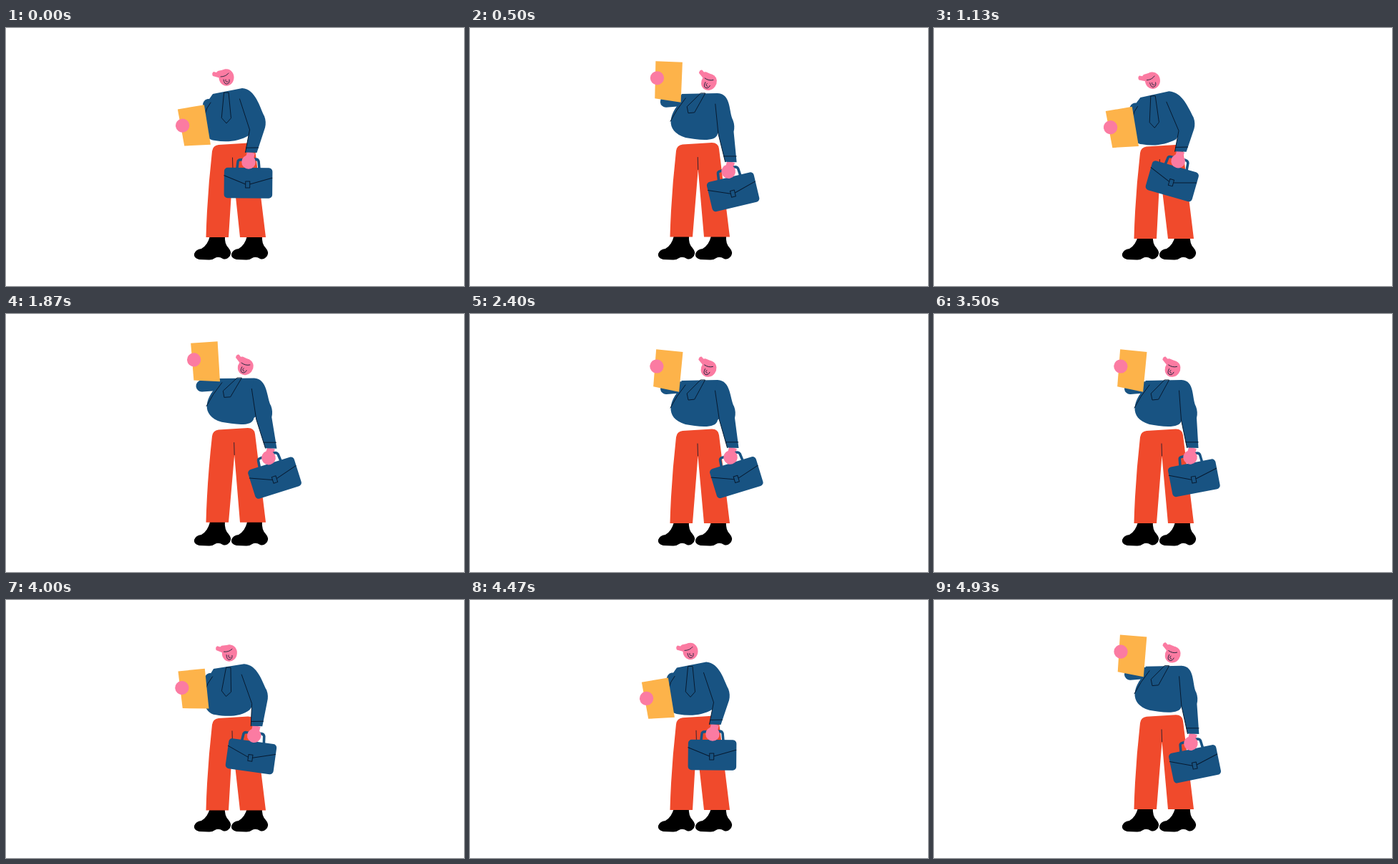
An HTML page that plays this animation: 640x360 px, repeating every 5000 ms.

```html
<!DOCTYPE html>
<html lang="en">
<head>
<meta charset="utf-8">
<title>Office worker</title>
<style>
  html, body { margin: 0; width: 100%; height: 100%; overflow: hidden; background: #fff; }
  svg { display: block; width: 100%; height: 100%; }
  .blue { fill: #185382; }
  .pink { fill: #fb7ba2; }
  .line { fill: none; stroke: #071a30; stroke-linejoin: round; stroke-linecap: round; }
  .thin { stroke-width: 0.8; }
</style>
</head>
<body>
<svg viewBox="0 0 640 360">
  <defs>
    <path id="shoe" d="M285 290H306Q305 301 311 307Q316 313 313 318Q308 324 303 322Q297 318 292 321Q288 324 283 323.5L270 323Q262 321 263 315Q265 309 273 308Q282 303 285 290Z"/>
  </defs>
  <use href="#shoe"/>
  <use href="#shoe" x="52"/>
  <path id="legs" fill="#f04a2c"/>
  <path id="crotch" class="line thin"/>
  <path id="sleeve" fill="none" stroke="#185382" stroke-width="16" stroke-linecap="round"/>
  <path id="torso" class="blue"/>
  <path id="fold" class="line"/>
  <path id="tie" class="line"/>
  <path id="wrist" fill="none" stroke="#fb7ba2" stroke-width="11"/>
  <path id="arm" class="blue"/>
  <path id="seam" class="line"/>
  <g id="bag">
    <path d="M-16 9L-15 0Q-15-3-11-3L10-4Q13-4 14-1L15 9" fill="none" stroke="#185382" stroke-width="3.600"/>
    <rect class="blue" x="-34" y="8" width="67.500" height="42.500" rx="5"/>
    <path class="line" d="M-34 19L-4 31M33 22L2 31M-4 27H2V36H-4Z"/>
    <circle class="pink" r="9.800"/>
  </g>
  <g id="paper">
    <path fill="#fdb34a" d="M-19-27L18.500-27V29L-18 25Z"/>
    <circle class="pink" cx="-16" cy="-3.500" r="9.600"/>
  </g>
  <g id="head">
    <ellipse class="pink" rx="10.500" ry="11.700"/>
    <path class="pink" d="M-1-11.500L-12-9L-14-7L-18-8Q-21-6-19-2L-8 1Z"/>
    <path class="line thin" d="M-8-1Q-1-1 3-6M-4 3Q-3 10 1 9Q5 8 4 3M-1 3Q-2 7 2 6"/>
  </g>
</svg>
<script>
const FPS = 30, LOOP = 5000;
const CYCLE = 44, LIFT = 16, LOWER_AT = 25, LOWER = 13;   // in steps

// Each joint: x, y standing at rest, then x, y while reading.
const joints = {
  head: [308, 69, 333.5, 76.5],
  neck: [289, 92, 295, 93],
  shoulder: [330, 84, 346, 92],
  elbow: [363, 130, 368, 136],
  hand: [339, 187, 358, 200],
  hip: [339, 150, 346, 148],
  hem: [326, 158, 344, 161],
  waist: [292, 157, 301, 154],
  belly: [274, 156, 271, 145],
  chest: [275, 132, 277, 119],
  side: [277, 109, 300, 98],
  cuff: [284, 114, 274, 104],
  crease: [286, 104, 301, 99],
  creaseEnd: [278, 120, 280, 131],
  knot: [308, 90, 325.5, 92],
  tip: [308, 133, 305, 120],
  paper: [263, 137, 276.5, 78]
};

const rest = { lean: 0, raise: 0, turn: -9.3, dip: 0, tilt: 0.5, sway: 0 };
const read = { lean: 1, raise: 1, turn: 5.5, dip: 0, tilt: -11, sway: 0 };
const slump = { lean: -0.1, raise: 0, turn: -9.5, dip: 5, tilt: 16, sway: 4 };
const reach = { lean: 1.05, raise: 1.17, turn: -3.5, dip: -3, tilt: -17.5, sway: 8 };

const lift = [[0, rest], [0.07, { ...rest, dip: 2.5 }], [0.62, { ...reach, raise: 1.3 }], [0.69, reach], [1, read]];
const lower = [[0, read], [0.15, { ...read, tilt: -17, sway: 6 }], [0.615, slump], [1, rest]];

const $ = id => document.getElementById(id);
const lerp = (a, b, k) => a + (b - a) * k;
const between = (p, q, k) => [lerp(p[0], q[0], k), lerp(p[1], q[1], k)];
const add = (p, x, y) => [p[0] + x, p[1] + y];
const setPath = (id, d) => $(id).setAttribute('d', d);
const place = (id, [x, y], turn) =>
  $(id).setAttribute('transform', `translate(${x} ${y}) rotate(${turn})`);

function follow(keys, p) {
  const i = Math.max(1, keys.findIndex(k => k[0] >= p));
  const [t0, from] = keys[i - 1], [t1, to] = keys[i];
  const k = (1 - Math.cos(Math.PI * (p - t0) / (t1 - t0))) / 2;
  return Object.fromEntries(Object.keys(from).map(n => [n, lerp(from[n], to[n], k)]));
}

function stateAt(step) {
  const s = (step - 1 + CYCLE) % CYCLE;
  return s < LOWER_AT
    ? { ...follow(lift, Math.min(1, s / LIFT)), arc: 17 }
    : { ...follow(lower, Math.min(1, (s - LOWER_AT) / LOWER)), arc: 6 };
}

function pose({ lean, raise, dip, sway, arc }) {
  const j = {};
  for (const name in joints) {
    const [x0, y0, x1, y1] = joints[name];
    const k = name === 'paper' ? raise : lean;
    const drop = { hand: 0, elbow: 0.4, paper: 0.5 }[name] ?? 1;
    j[name] = [lerp(x0, x1, k), lerp(y0, y1, k) + dip * drop];
  }
  j.hand[0] += sway;
  j.elbow[0] += sway / 2;
  j.paper[0] -= arc * Math.sin(Math.PI * Math.min(1, Math.max(0, raise)));
  return j;
}

function drawLegs(dip, lean) {
  const top = 162 + dip * 0.5, hem = 292 + dip * 0.4;
  const fork = [317 - dip * 0.2 + lean * 1.5, top + 36];
  setPath('legs', `M279.500 ${hem}Q281 ${hem - 58} 288 ${top + 10}Q289 ${top + 2} 297 ${top + 1}` +
    `L338 ${top - 1.5}Q347 ${top - 1.5} 348 ${top + 7}L363 ${hem}H327L${fork}L311 ${hem}Z`);
  setPath('crotch', `M${add(fork, -0.5, -17)}L${fork}`);
}

function drawArm(j) {
  const { shoulder, elbow, hand } = j;
  const wrist = add(hand, 3.5, -13.5);
  const out = add(wrist, 8, 0.5), inn = add(wrist, -8, 0);
  const bend = add(elbow, -22.5, 12), pit = add(shoulder, -3.5, 15);
  setPath('arm', `M${shoulder}C${add(shoulder, 19, 1)} ${add(elbow, -8, -18)} ${add(elbow, -2, -7)}` +
    `Q${add(elbow, 1, 1)} ${add(elbow, -1, 9)}L${out}L${inn}L${bend}L${pit}Z`);
  setPath('seam', `M${pit}L${bend}L${inn}M${between(bend, inn, 0.8)}L${between(elbow, out, 0.84)}`);
  setPath('wrist', `M${wrist}L${hand}`);
}

function drawTie({ knot, tip }) {
  const [x, y] = [tip[0] - knot[0], tip[1] - knot[1]];
  const w = 6.5 / Math.hypot(x, y), wide = between(knot, tip, 0.83);
  setPath('tie', `M${add(knot, -3, 0)}L${add(knot, 3, 0)}L${add(wide, y * w, -x * w)}` +
    `L${tip}L${add(wide, -y * w, x * w)}Z`);
}

function draw(state) {
  const j = pose(state);
  drawLegs(state.dip, state.lean);
  setPath('torso', `M${j.neck}L${j.shoulder}L${add(j.elbow, -10, 0)}L${j.hip}` +
    `C${j.hem} ${add(j.waist, 17, 3)} ${j.waist}C${j.belly} ${j.chest} ${j.side}Z`);
  setPath('sleeve', `M${j.cuff}L${add(j.crease, -3, 3)}`);
  setPath('fold', `M${j.crease}Q${between(add(j.crease, -5, 0), j.creaseEnd, 0.5)} ${j.creaseEnd}`);
  drawTie(j);
  drawArm(j);
  place('bag', j.hand, state.tilt);
  place('paper', j.paper, state.turn);
  place('head', j.head, 36 * state.lean);
}

function tick(now) {
  const t = now % LOOP;
  draw(stateAt(Math.floor((t + 4) * FPS / 1000)));
  requestAnimationFrame(tick);
}
draw(stateAt(0));
requestAnimationFrame(tick);
</script>
</body>
</html>
```
